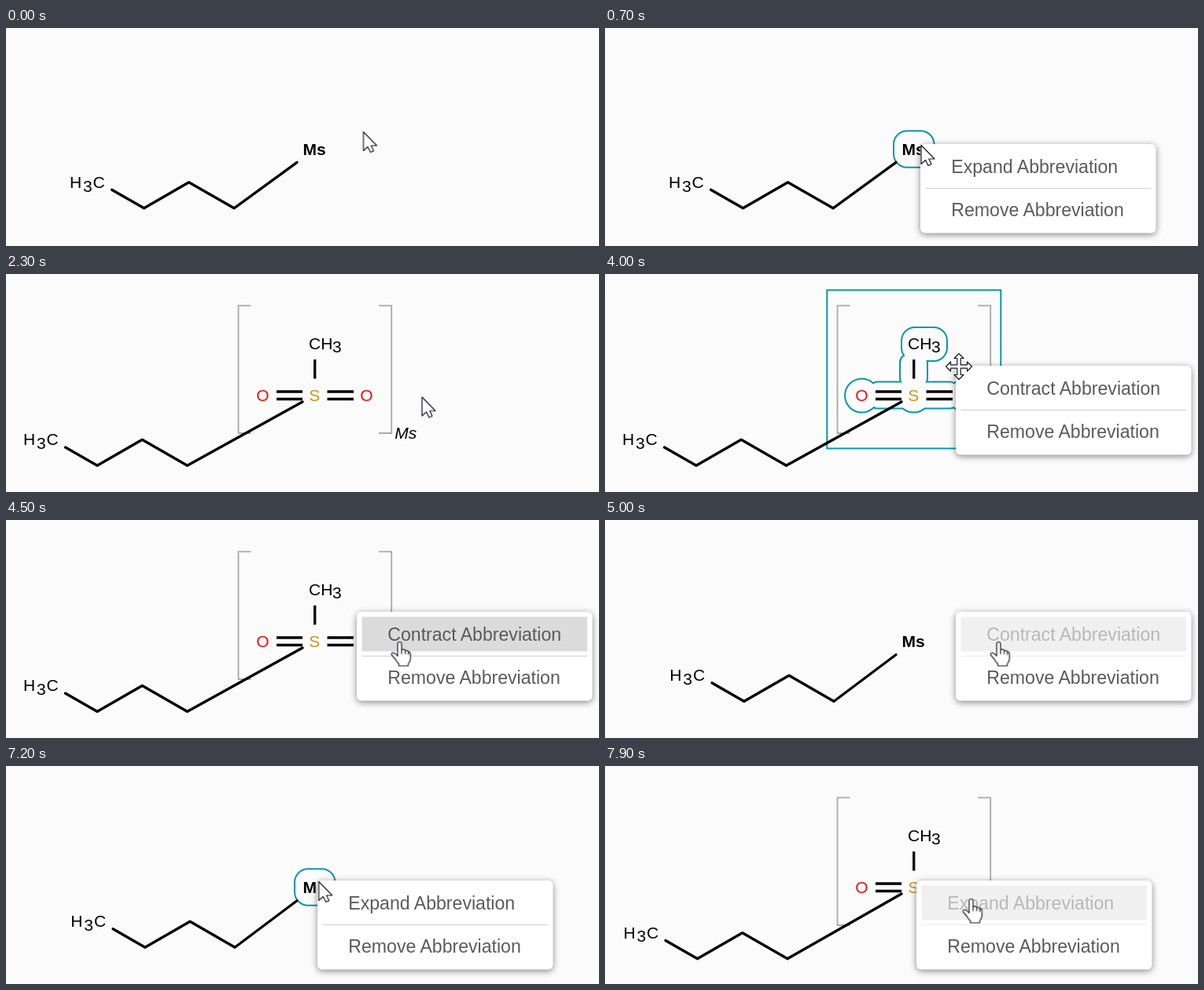
An HTML page that plays this animation: 754 px wide and 278 px high, repeating every 8 s.

```html
<!DOCTYPE html>
<html lang="en">
<head>
<meta charset="utf-8">
<title>Abbreviation menu</title>
<style>
html, body { margin: 0; width: 100%; height: 100%; overflow: hidden; background: #fbfbfb; }
svg { display: block; width: 754px; height: 278px; }
text { font-family: "Liberation Sans", Arial, sans-serif; font-size: 21px; }
.bond { fill: none; stroke: #000; stroke-width: 3.3; stroke-linecap: round; stroke-linejoin: round; }
.flat { stroke-linecap: butt; }
.mid { text-anchor: middle; }
.bracket { fill: none; stroke: #a9a9a9; stroke-width: 1.8; }
.glow { fill: #fbfbfb; stroke: #0a97a8; stroke-width: 2; }
.rim { fill: none; stroke: #0a97a8; stroke-width: 4; }
.core { fill: #fbfbfb; }
.panel { fill: #fff; filter: drop-shadow(0 2px 4px #0007); }
.label { font-size: 23.1px; fill: #5a5a5a; }
.rule { stroke: #cfcfcf; }
.over { fill: #dcdbdb; }
.cursor path { fill: #fff; stroke: #16161f; stroke-width: 1.2; stroke-linejoin: round; }

/* 8 s loop on a 100 ms grid: 1.25% per tick */
.t { animation: 8s step-end infinite; }
.short1 { animation-name: short1; }
.short2 { animation-name: short2; }
.long { animation-name: long; }
.long1 { animation-name: long1; }
.long2 { animation-name: long2; }
.msGlow { animation-name: msGlow; }
.groupGlow { animation-name: groupGlow; }
.menu1 { animation-name: menu1; }
.menu2 { animation-name: menu2; }
.menu3 { animation-name: menu3; }
.item1 { animation-name: item1; }
.item2 { animation-name: item2; }
.item3 { animation-name: item3; }
.hand { animation-name: hand; }
.move { animation-name: groupGlow; }
.arrow { animation-name: arrow; }
.cursor { animation-name: path; }

@keyframes short1 { 0% { opacity: 1 } 15%, 100% { opacity: 0 } }
@keyframes short2 { 0% { opacity: 0 } 61.25% { opacity: 1 } 97.5%, 100% { opacity: 0 } }
@keyframes long { 0% { opacity: 0 } 15% { opacity: 1 } 61.25% { opacity: 0 } 97.5%, 100% { opacity: 1 } }
@keyframes long1 { 0% { opacity: 0 } 15% { opacity: 1 } 61.25%, 100% { opacity: 0 } }
@keyframes long2 { 0% { opacity: 0 } 97.5%, 100% { opacity: 1 } }
@keyframes msGlow { 0% { opacity: 0 } 6.25% { opacity: 1 } 10% { opacity: 0 } 86.25% { opacity: 1 } 93.75%, 100% { opacity: 0 } }
@keyframes groupGlow { 0% { opacity: 0 } 17.5% { opacity: 1 } 22.5% { opacity: 0 } 37.5% { opacity: 1 } 51.25%, 100% { opacity: 0 } }
@keyframes menu1 { 0% { opacity: 0 } 8.75% { opacity: 1 } 17.5%, 100% { opacity: 0 } }
@keyframes menu2 { 0% { opacity: 0 } 47.5% { opacity: 1 } 65%, 100% { opacity: 0 } }
@keyframes menu3 { 0% { opacity: 0 } 88.75%, 100% { opacity: 1 } }
@keyframes item1 { 0% { opacity: 1 } 15% { opacity: .8 } 16.25%, 100% { opacity: .43 } }
@keyframes item2 { 0% { opacity: 1 } 61.25% { opacity: .8 } 62.5%, 100% { opacity: .43 } }
@keyframes item3 { 0% { opacity: 1 } 97.5% { opacity: .8 } 98.75%, 100% { opacity: .43 } }
@keyframes hand {
  0% { opacity: 0 } 10% { opacity: 1 } 17.5% { opacity: 0 }
  51.25% { opacity: 1 } 67.5% { opacity: 0 } 93.75%, 100% { opacity: 1 }
}
@keyframes arrow {
  0% { opacity: 1 } 10% { opacity: 0 } 22.5% { opacity: 1 } 37.5% { opacity: 0 }
  67.5% { opacity: 1 } 93.75%, 100% { opacity: 0 }
}
@keyframes path {
  0% { transform: translate(454.5px, 132px); animation-timing-function: steps(6) }
  7.5% { transform: translate(402px, 149px) }
  8.75% { transform: translate(402px, 149px); animation-timing-function: steps(2) }
  11.25% { transform: translate(452.5px, 168px) }
  17.5% { transform: translate(452.5px, 168px); animation-timing-function: steps(4) }
  22.5% { transform: translate(508px, 162px); animation-timing-function: steps(3) }
  26.25% { transform: translate(529px, 156.5px) }
  33.75% { transform: translate(529px, 156.5px); animation-timing-function: steps(8) }
  43.75% { transform: translate(450px, 118px) }
  50% { transform: translate(450px, 118px); animation-timing-function: steps(4) }
  55% { transform: translate(500.5px, 155.5px) }
  67.5% { transform: translate(500.5px, 155.5px); animation-timing-function: steps(4) }
  72.5% { transform: translate(514px, 182px); animation-timing-function: steps(3) }
  76.25% { transform: translate(521px, 157px) }
  77.5% { transform: translate(521px, 157px); animation-timing-function: steps(2) }
  80% { transform: translate(508px, 159px) }
  81.25% { transform: translate(508px, 159px); animation-timing-function: steps(5) }
  87.5% { transform: translate(397.7px, 147px) }
  92.5% { transform: translate(397.7px, 147px); animation-timing-function: steps(3) }
  96.25%, 100% { transform: translate(465.5px, 169.5px) }
}
</style>
</head>
<body>
<svg viewBox="0 0 754 278">
  <defs>
    <g id="methyl">
      <text x="81" y="204">H</text><text x="98" y="208.7">3</text><text x="110.6" y="204">C</text>
    </g>
    <text id="ms" x="377.5" y="162" font-weight="bold">Ms</text>
    <g id="halo">
      <rect x="378" y="69" width="56" height="41" rx="16"/>
      <rect x="376" y="103" width="33" height="40" rx="10"/>
      <rect x="340" y="138.5" width="105" height="32" rx="6"/>
      <circle cx="326.5" cy="155" r="20.5"/>
      <circle cx="392.5" cy="155" r="20.5"/>
      <circle cx="458.5" cy="155" r="20.5"/>
    </g>
    <g id="panel">
      <rect class="panel" width="299.5" height="113.5" rx="6"/>
      <text class="label" x="39.3" y="92.3">Remove Abbreviation</text>
    </g>
    <path id="rule" class="rule" d="M6.5 56.5H293"/>
    <rect id="over" class="over" x="6.5" y="6.5" width="286.5" height="44"/>
  </defs>

  <g class="t groupGlow">
    <rect class="glow" x="282.3" y="20.5" width="221" height="202"/>
    <use href="#halo" class="rim"/>
    <use href="#halo" class="core"/>
  </g>
  <rect class="glow t msGlow" x="367" y="131.2" width="51.5" height="46.5" rx="17"/>

  <g class="t short1">
    <use href="#methyl"/><use href="#ms"/>
    <path class="bond" d="M134.5 206.2 175.5 229.8 232.5 196.8 290 229.8 370 171.3"/>
  </g>
  <g class="t short2">
    <use href="#methyl" x="1.3" y="1"/><use href="#ms"/>
    <path class="bond" d="M136 207.7 176.8 231.3 234 198.3 291 231.3 370 171.7"/>
  </g>

  <g class="t long">
    <path class="bracket" d="M311.5 40.3H295.5V203H311.5M474 40.3H490.2V203H474"/>
    <path class="bond flat" d="M392.7 109V133.5M344 150H377M344 159.5H377M408.5 150H442M408.5 159.5H442"/>
    <text x="385" y="96">CH</text><text x="415" y="100">3</text>
    <text class="mid" x="326.5" y="162" fill="#f00d0d">O</text>
    <text class="mid" x="392.3" y="162" fill="#c99a19">S</text>
    <text class="mid" x="458.5" y="162" fill="#f00d0d">O</text>
    <text x="494.3" y="210" font-style="italic">Ms</text>
  </g>
  <g class="t long1">
    <use href="#methyl" x="-59" y="14"/>
    <path class="bond" d="M75.5 221 116 244.3 173.2 211.3 230.5 244.3 377 163"/>
  </g>
  <g class="t long2">
    <use href="#methyl" x="-57.5" y="15.5"/>
    <path class="bond" d="M77 222.5 117.5 245.8 174.7 212.8 232 245.8 377 163"/>
  </g>

  <g class="t menu1"><g transform="translate(401 148)">
    <use href="#panel"/>
    <g class="t item1">
      <use href="#over" class="t hand"/><use href="#rule"/>
      <text class="label" x="39.3" y="37.2">Expand Abbreviation</text>
    </g>
  </g></g>
  <g class="t menu2"><g transform="translate(446 117)">
    <use href="#panel"/>
    <g class="t item2">
      <use href="#over" class="t hand"/><use href="#rule"/>
      <text class="label" x="39.3" y="36.8">Contract Abbreviation</text>
    </g>
  </g></g>
  <g class="t menu3"><g transform="translate(396 146)">
    <use href="#panel"/>
    <g class="t item3">
      <use href="#over" class="t hand"/><use href="#rule"/>
      <text class="label" x="39.3" y="37.2">Expand Abbreviation</text>
    </g>
  </g></g>

  <g class="cursor t">
    <path class="t arrow" d="M0 .5V24.5L5.5 19.5 9 26.5 13 24.7 9.8 18H17Z"/>
    <g class="t hand">
      <path d="M-2.5 17.5V2.5a2.5 2.5 0 0 1 5 0V10q3.5-1.5 4.7 1.2q3-1 4 1.5q2.6-.3 2.6 3V21.5q0 3-2.8 6.5V30.5H-1V28q-3-3-4.5-6l-4.3-5q-1.5-3.5 2-3.2q3 .7 5.3 4.2ZM2.5 10V15.5M7.2 11.2V15.5M11.2 12.7V16.5"/>
    </g>
    <path class="t move" d="M0-16.5 6-10.5H2.2V-2.2H10.5V-6L16.5 0 10.5 6V2.2H2.2V10.5H6L0 16.5-6 10.5H-2.2V2.2H-10.5V6L-16.5 0-10.5-6V-2.2H-2.2V-10.5H-6Z"/>
  </g>
</svg>
</body>
</html>
```
